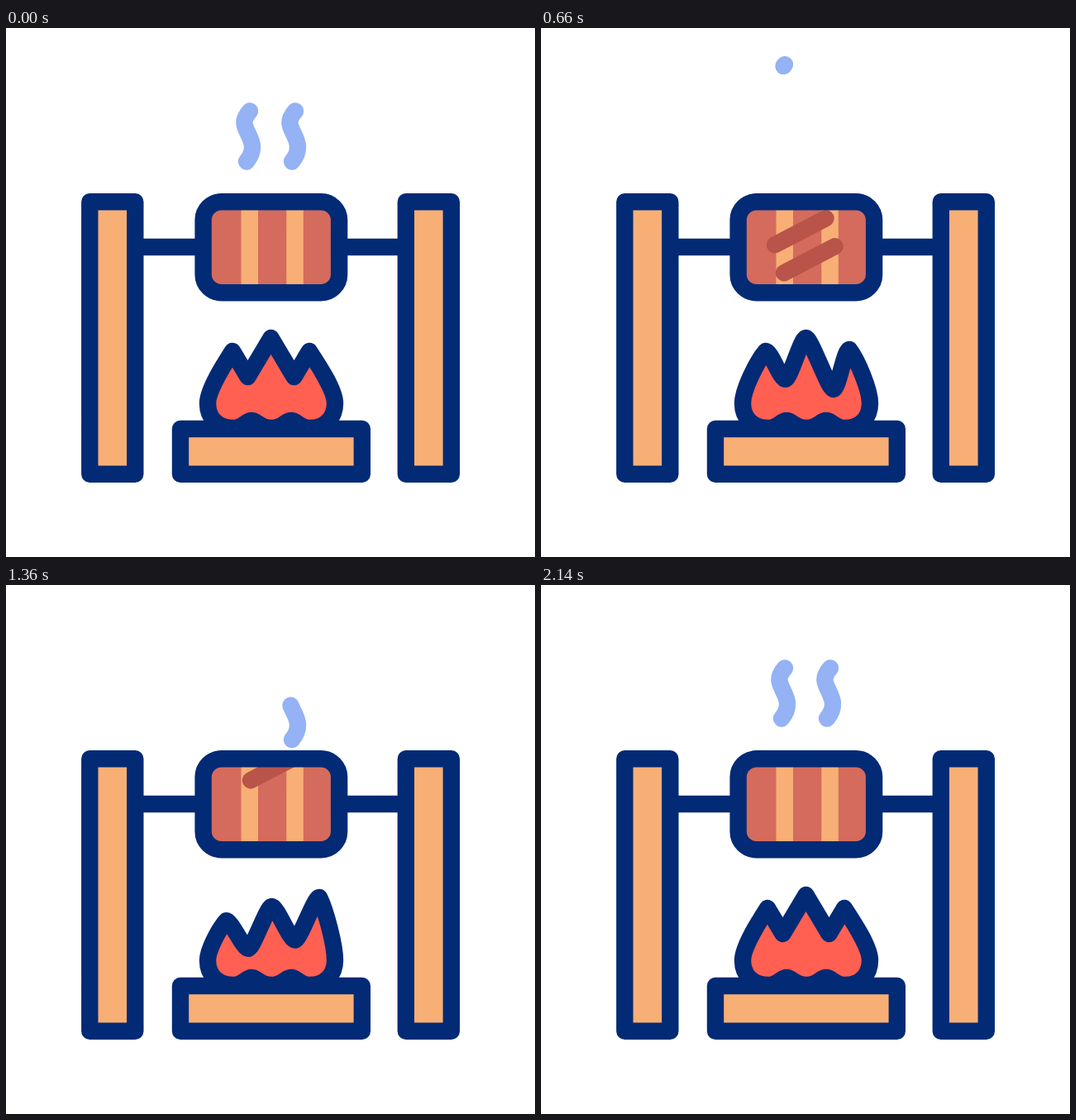
An HTML page that plays this animation: 640 px wide and 640 px high, repeating every 2400 ms.

```html
<!DOCTYPE html>
<html>
<head>
<meta charset="utf-8">
<style>
html, body { margin: 0; width: 100%; height: 100%; overflow: hidden; background: #fff; }
svg { display: block; width: 100%; height: 100%; }
.line { stroke: #032a75; stroke-width: 20.4; stroke-linejoin: round; }
.wood { fill: #f8af75; }
.steam { fill: none; stroke: #94b2f4; stroke-width: 20.4; stroke-linecap: round; }
.char { stroke: #b85449; stroke-width: 20.4; stroke-linecap: round; }
</style>
</head>
<body>
<svg viewBox="0 0 640 640">
  <clipPath id="inside"><rect x="238.6" y="210.3" width="164.5" height="109.9" rx="22"/></clipPath>
  <path class="line" d="M156 265H484"/>
  <g id="steam"></g>
  <g clip-path="url(#inside)">
    <path fill="#d46b5d" d="M230 200h180v130H230z"/>
    <path class="wood" d="M284.5 205h20.5v120h-20.5zM339.3 205h20.5v120h-20.5z"/>
    <path class="char" id="marks" d="M0 0l61.5-32M-11-34l61.5-32"/>
  </g>
  <rect class="line" x="238.6" y="210.3" width="164.5" height="109.9" rx="22" fill="none"/>
  <path id="fire" class="line" fill="#ff6052"/>
  <path class="line wood" d="M101.3 210.3h55v329.5h-55zM483.8 210.3h55v329.5h-55zM211 485h219.8v54.8H211z"/>
</svg>
<script>
const $ = id => document.getElementById(id);
const LOOP = 2400, REST = 2140;

const wisps = [295, 350].map(x => {
  const w = document.createElementNS('http://www.w3.org/2000/svg', 'path');
  w.setAttribute('class', 'steam');
  w.setAttribute('pathLength', 100);
  w.setAttribute('d', `M${x} 100.5c-10 11.5-7 17.5-2 27.5s9 20-2 33.5`);
  return $('steam').appendChild(w);
});

// Eased progress of t from a to b
const ease = (t, a, b) => {
  const u = Math.min(1, Math.max(0, (t - a) / (b - a)));
  return u * u * (3 - 2 * u);
};

const beats = [0, 440, 880, 1280, 1760, REST];

function drawFire(t) {
  const [a, b, c, d, e] = beats.slice(1).map((end, i) => ease(t, beats[i], end));
  const flick = a - 2 * b + 2 * c - 2 * d + e;  // swings between 1 and -1
  const live = a - e, spike = a - b, lean = d - e;
  const ridge = [
    [274 - 2 * live - 5 * flick - 16 * lean, 391 + 18 * flick],
    [292.5 + 3 * live - 3 * flick, 422 + 3 * live + 17.5 * flick],
    [320.5 + 14.5 * lean, 375 + 16.5 * flick],
    [348.5 + live + 8.5 * spike, 422 + 11 * live - 4 * flick + 8 * spike],
    [367 + 12 * (b - e), 391 - 15.5 * flick - 4.5 * spike]
  ];
  const soft = 6 * live, pull = .3 - .1 * live;

  // Handles of the outer slope, foot first
  const slope = (foot, [x, y]) => {
    const h = 454 - y;
    return [[foot, 454 - h / 4], [x + (foot - x) * .4, y + h * pull]];
  };
  const [l1, l2] = slope(244, ridge[0]), [r1, r2] = slope(398, ridge[4]);
  let path = `M244 454C${l1} ${l2} ${ridge[0]}`;
  for (let i = 1; i < ridge.length; i++) {
    const [x, y] = ridge[i - 1], [u, v] = ridge[i];
    path += `C${x + soft} ${y} ${u - soft} ${v} ${u} ${v}`;
  }
  $('fire').setAttribute('d', path + `C${r2} ${r1} 398 454` +
    'C398 472 386 484 368 484C355 484 352 475 345 475S335 484 320.5 484' +
    'S304 475 297 475S287 484 275 484C256 484 244 472 244 454Z');
}

function drawSteam(t) {
  const rising = t < 1000;
  const y = rising ? -60 * ease(t, 0, 780) : 34 * (1 - ease(t, 1130, 1840));
  $('steam').setAttribute('transform', `translate(0 ${y})`);
  wisps.forEach((w, i) => {
    const lag = i ? 0 : 310;
    const len = 100 * (rising ? 1 - ease(t, lag, lag + 395) : ease(t, 1120 + lag, 1510 + lag));
    w.style.display = len > .5 ? '' : 'none';
    w.style.strokeDasharray = len > 99.9 ? 'none' : `${len} 300`;
    w.style.strokeDashoffset = rising ? 0 : len - 100;
  });
}

function drawMarks(t) {
  const [x, y] = t < 1080 ? [294, 137 + t * .241] : [296, 271 + (t - 1500) * .25];
  $('marks').setAttribute('transform', `translate(${x} ${y})`);
}

function frame() {
  const t = Math.min(performance.now() % LOOP, REST);
  drawFire(t);
  drawSteam(t);
  drawMarks(t);
  requestAnimationFrame(frame);
}
frame();
</script>
</body>
</html>
```
